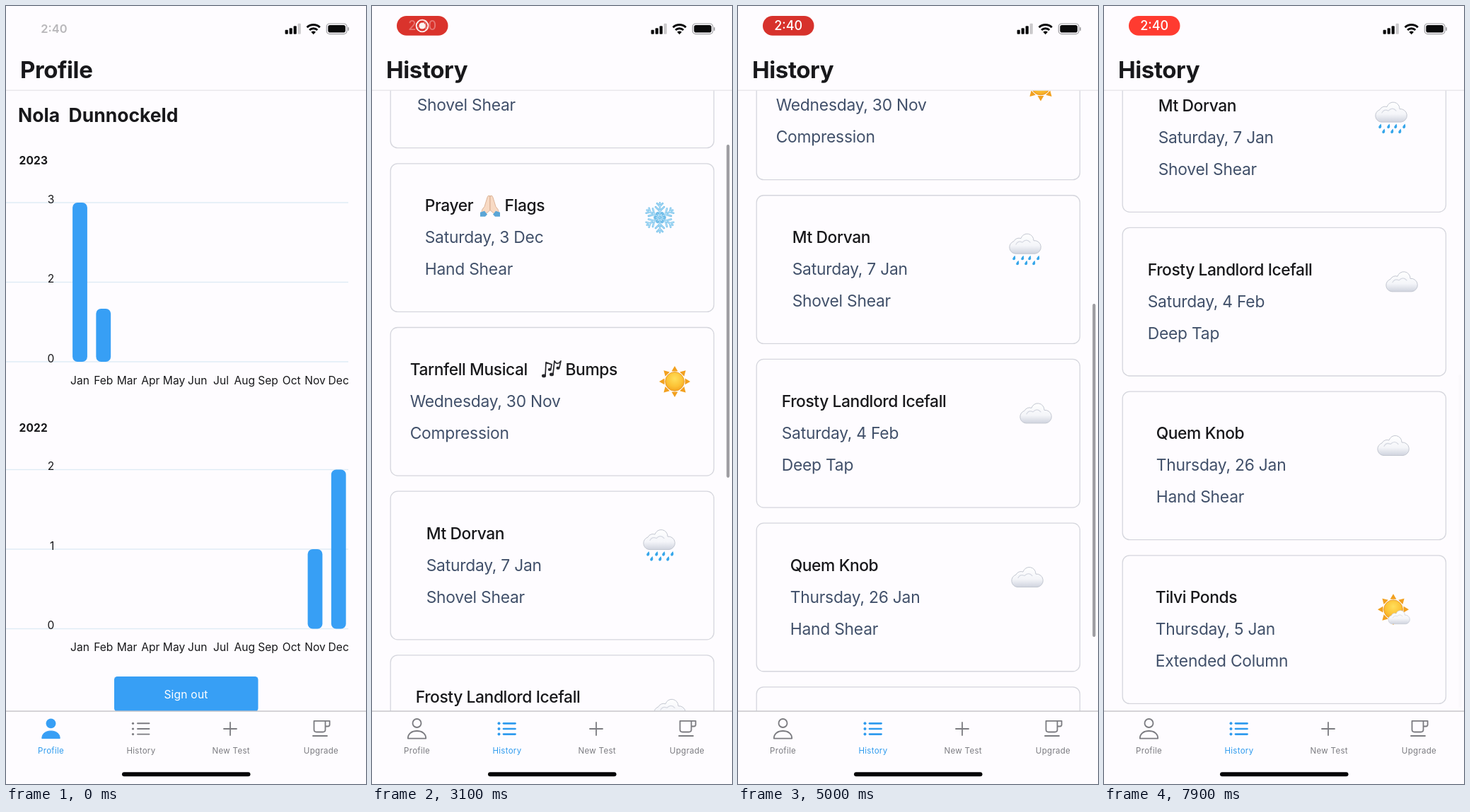
These frames come from a looping animation (509 px wide and 1100 px high, 8 s). An HTML page:

```html
<!DOCTYPE html>
<html lang="en">
<head>
<meta charset="utf-8">
<style>
html, body { margin: 0; width: 100%; height: 100%; overflow: hidden; background: #fefcff }
svg { display: block; font-family: Inter, "Open Sans", sans-serif; fill: #18181b }
.title { font-size: 33px; font-weight: 700; letter-spacing: -.4px }
.name { font-size: 26.5px; font-weight: 700 }
.year { font-size: 15.5px; font-weight: 700; letter-spacing: .2px }
.axis { font-size: 15.6px }
.button { font-size: 15.6px; letter-spacing: .2px; fill: #fff }
.place { font-size: 22.8px; font-weight: 500; letter-spacing: -.4px }
.detail { font-size: 22.8px; letter-spacing: -.22px; fill: #41506a }
.tab { font-size: 11.5px; letter-spacing: .3px }
.clock { font-size: 16.5px; font-weight: 600 }
.mid { text-anchor: middle }
.end { text-anchor: end }
</style>
</head>
<body>
<svg id="stage" width="509" height="1100" viewBox="0 0 509 1100"></svg>
<script>
const LOOP = 8000, SWITCH = 1600, PITCH = 231.7, BLUE = '#379ff5', PAGE = '#fefcff';
const stage = document.getElementById('stage');

const text = (x, y, cls, s, extra = '') => `<text x="${x}" y="${y}" class="${cls}" ${extra}>${s}</text>`;
const rect = (x, y, w, h, fill, r = 0, extra = '') =>
  `<rect x="${x}" y="${y}" width="${w}" height="${h}" fill="${fill}" rx="${r}" ${extra}/>`;
const path = (d, extra) => `<path d="${d}" ${extra}/>`;
const line = (color, w) => `fill="none" stroke="${color}" stroke-width="${w}" stroke-linecap="round" stroke-linejoin="round"`;
const at = (x, y, body, extra = '') => `<g transform="translate(${x} ${y}) ${extra}">${body}</g>`;
const spin = (n, body) => Array.from({ length: n }, (_, i) => `<g transform="rotate(${i * 360 / n})">${body}</g>`).join('');

// Small pictures, each centred on 0,0
const cloud = path('M-13 14a9 9 0 0 1-2-17.5a8 8 0 0 1 10-4a9.2 9.2 0 0 1 18 3a9.3 9.3 0 0 1 2 18.5z',
  'fill="url(#cloud)" stroke="#c3c7d1" stroke-width="1"') +
  path('M-12 1q3-6 9-3q6-6 11 0', line('#d6d9e2', 1.2));
const sun = spin(8, path('M-4.4-14.5L0-22L4.4-14.5z', 'fill="#f2a01f"')) +
  '<circle r="13.3" fill="url(#sun)" stroke="#e9981d" stroke-width=".9"/>';
const drop = (x, y) => path(`M${x + 2.5} ${y - 3.5}q2.2 6-1.6 6.6q-4.2-1 1.6-6.6z`, 'fill="#35a6ea"');
const icons = {
  sun,
  cloud,
  rain: at(0, -8, cloud) + [[-16, 12], [-4, 12], [6, 12], [18, 12], [-11, 19], [1, 19], [12, 19]].map(p => drop(...p)).join(''),
  partly: sun + at(7.5, 11, cloud, 'scale(.68)'),
  snow: spin(6, path('M0 0V-21M-4-20L0-16L4-20M-6-15L0-9L6-15M-3-7L0-4L3-7', line('#6fbde9', 2.6)) +
    path('M0 0V-21M-4-20L0-16L4-20M-6-15L0-9L6-15', line('#c4e8fa', 1)))
};
const notes = path('M-9 9L-8-10L0-7L-1-1M2 6L4-12Q8-5 13-12L11-3', line('#27272b', 1.7)) +
  '<g fill="#27272b"><ellipse cx="-11" cy="9" rx="3" ry="2.4"/><ellipse cx="-2.8" cy="0" rx="2.5" ry="2"/>' +
  '<ellipse cx="0" cy="7" rx="3" ry="2.4"/><ellipse cx="9" cy="-2" rx="2.6" ry="2.1"/></g>';
const half = path('M0-14q-3-2-4 2L-8 1q-4 4-4 7l4 5L0 6z', 'fill="#f8dac4" stroke="#d3a688" stroke-width=".8"') +
  path('M-14 9l6-2l4 5l-3 3h-7z', 'fill="#5aa5d6"');
const hands = half + at(0, 0, half, 'scale(-1 1)');

function chart(top, year, values, bars) {
  const months = 'Jan Feb Mar Apr May Jun Jul Aug Sep Oct Nov Dec'.split(' ');
  const center = i => 104.5 + i * 33.25;
  return text(18.5, top - 54, 'year', year) +
    values.map((v, i) => rect(0, top + i * 112.5 - .7, 484, 1.4, '#deebf5') +
      text(68.3, top + i * 112.5 + .5, 'axis end', v)).join('') +
    bars.map(([i, h]) => rect(center(i) - 10.4, top + 225 - h, 20.8, h, BLUE, 7)).join('') +
    '<g clip-path="url(#plot)">' +
    months.map((m, i) => text(center(i), top + 256.5, 'axis mid', m)).join('') + '</g>';
}

const profile = text(17, 164, 'name', 'Nola') + text(88.5, 164, 'name', 'Dunnockeld') +
  chart(278, 2023, [3, 2, 0], [[0, 225], [1, 75]]) +
  chart(655.5, 2022, [2, 1, 0], [[10, 112.5], [11, 225]]) +
  rect(153, 948, 203.5, 49.5, BLUE, 4.5) + text(254.5, 979, 'button mid', 'Sign out');

const tests = [
  [65, 'Larkspur Shoulder Bowl', 'Saturday, 26 Nov', 'Shovel Shear', 'cloud'],
  [76, 'Prayer', 'Saturday, 3 Dec', 'Hand Shear', 'snow', at(167, 60.5, hands) + text(187.5, 68, 'place', 'Flags')],
  [55, 'Tarnfell Musical', 'Wednesday, 30 Nov', 'Compression', 'sun', at(254, 60, notes) + text(273.5, 68, 'place', 'Bumps')],
  [78, 'Mt Dorvan', 'Saturday, 7 Jan', 'Shovel Shear', 'rain'],
  [63, 'Frosty Landlord Icefall', 'Saturday, 4 Feb', 'Deep Tap', 'cloud'],
  [75, 'Quem Knob', 'Thursday, 26 Jan', 'Hand Shear', 'cloud'],
  [74, 'Tilvi Ponds', 'Thursday, 5 Jan', 'Extended Column', 'partly']
];
const card = ([x, place, date, kind, icon, more = ''], i) => at(0, 129.7 + i * PITCH,
  rect(26.2, .6, 457.2, 209.6, 'none', 10, 'stroke="#d5d6dd" stroke-width="1.3"') +
  text(x - 1.3, 68, 'place', place) + more +
  text(x - 1.3, 113, 'detail', date) + text(x - 1.3, 158, 'detail', kind) +
  at(483 - x, 77, icons[icon]));

function tabBar(active) {
  const color = i => i === active ? '#2f9bee' : '#7b7b80';
  const on = active === 1, body = 'M50.8 1035.6c0-7 5.5-10.6 12.7-10.6s12.7 3.6 12.7 10.6z';
  const person = active === 0
    ? `<g fill="${BLUE}"><circle cx="63.5" cy="1014.3" r="6.9"/>${path(body, `stroke="${BLUE}" stroke-linejoin="round"`)}</g>`
    : `<circle cx="63.5" cy="1014" r="6" ${line(color(0), 1.8)}/>` + path(body, line(color(0), 1.8));
  const list = [1014.3, 1022, 1029.6].map(y =>
    path(`M186 ${y}H202.5`, line(color(1), on ? 2.7 : 1.9)) +
    `<circle cx="179.5" cy="${y}" r="${on ? 2 : 1.6}" fill="${color(1)}"/>`).join('');
  const plus = path('M308 1022H326M317 1013V1031', line(color(2), 1.8));
  const cup = path('M435.5 1010.8H457.6V1016q0 2.5-2.5 2.5H451.5M435.5 1010.8V1023q0 3.5 3.5 3.5H448q3.5 0 3.5-3.5V1010.8M434 1032H454', line(color(3), 1.8));
  return person + list + plus + cup + ['Profile', 'History', 'New Test', 'Upgrade']
    .map((s, i) => text(63.6 + i * 127.3, 1057.2, 'tab mid', s, `fill="${color(i)}"`)).join('');
}

const status = [6, 8.5, 11.5, 15].map((h, i) =>
  rect(394.6 + i * 6, 39.8 - h, 4.2, h, i < 3 ? '#0b0b0c' : '#cbc9cc', 1)).join('') +
  path('M425.6 30.2a13 13 0 0 1 18.2 0M429.1 34a8 8 0 0 1 11.2 0', 'fill="none" stroke="#0b0b0c" stroke-width="3"') +
  path('M434.7 40.2l-3.3-3.4q3.3-2.4 6.6 0z', 'fill="#0b0b0c"') +
  rect(453.3, 25, 28.6, 14.6, 'none', 4.3, 'stroke="#a09fa3" stroke-width="1.2"') +
  rect(455.3, 27, 24.6, 10.6, '#0b0b0c', 2.8) + rect(483.2, 30, 1.7, 5, '#a09fa3', .8);

const screen = (id, title, body, active) => `<g id="${id}">${body}` +
  rect(0, 0, 509, 119, PAGE) + rect(0, 118.6, 509, 1.2, '#e4e3e8') + text(20, 102, 'title', title) +
  rect(0, 997, 509, 103, PAGE) + rect(0, 996.3, 509, 1.5, '#c8c7cb') + tabBar(active) + '</g>';

stage.innerHTML = `<defs>
  <linearGradient id="cloud" x2="0" y2="1"><stop stop-color="#fff"/><stop offset=".6" stop-color="#f4f5f9"/><stop offset="1" stop-color="#cfd3de"/></linearGradient>
  <radialGradient id="sun" cy=".35" r=".7"><stop stop-color="#ffdf5c"/><stop offset=".6" stop-color="#fcc235"/><stop offset="1" stop-color="#f3a01f"/></radialGradient>
  <clipPath id="plot"><rect width="484" height="1000"/></clipPath></defs>` +
  rect(0, 0, 509, 1100, PAGE) +
  screen('profile', 'Profile', profile, 0) +
  screen('history', 'History', `<g id="list">${tests.map(card).join('')}</g>` +
    rect(501.3, 121, 4.2, 471, '#9c9ba0', 2.1, 'id="bar"'), 1) +
  status + rect(164, 1083.2, 181.5, 6, '#060607', 3) +
  text(68, 38.3, 'clock mid', '2:40', 'id="oldClock"') +
  '<g id="pill">' + rect(35, 14, 72.5, 27.8, '#ff3b30', 13.9, 'id="pillShape"') +
  '<g id="record"><circle cx="71" cy="28" r="8.4" fill="none" stroke="#fff" stroke-width="1.8"/><circle cx="71" cy="28" r="4.6" fill="#fff"/></g>' +
  text(71.2, 34.4, 'mid', '2:40', 'id="clock" fill="#fff" font-size="18" font-weight="500"') + '</g>';

const el = {};
stage.querySelectorAll('[id]').forEach(n => el[n.id] = n);

const ramp = (t, a, b) => Math.min(1, Math.max(0, (t - a) / (b - a)));
const scrollKeys = [[2300, 0], [3100, 139], [3900, 359], [4500, 472.5], [5800, 669], [7200, 743.7]];

// Smooth curve through the keys, at rest at both ends
function scrollAt(t) {
  const k = scrollKeys, last = k.length - 1;
  if (t <= k[0][0]) return k[0][1];
  if (t >= k[last][0]) return k[last][1];
  const rate = i => (k[i + 1][1] - k[i][1]) / (k[i + 1][0] - k[i][0]);
  const slope = i => i === 0 || i === last ? 0 : (rate(i - 1) + rate(i)) / 2;
  const i = k.findIndex(p => p[0] > t) - 1;
  const [t0, a] = k[i], [t1, b] = k[i + 1], d = t1 - t0, u = (t - t0) / d, v = 1 - u;
  return a * v * v * (1 + 2 * u) + b * u * u * (3 - 2 * u) + d * u * v * (slope(i) * v - slope(i + 1) * u);
}

function draw(t) {
  const onHistory = t >= SWITCH, s = scrollAt(t);
  el.profile.style.display = onHistory ? 'none' : '';
  el.history.style.display = onHistory ? '' : 'none';
  el.list.setAttribute('transform', `translate(0 ${-s})`);
  el.bar.setAttribute('transform', `translate(0 ${s * .538})`);
  el.bar.style.opacity = ramp(t, 2280, 2400) * (1 - .97 * ramp(t, 7500, 7850));

  const glow = (1 + Math.cos((t - 1900) * Math.PI / 1000)) / 2;
  el.pillShape.setAttribute('fill', `rgb(${214 + 41 * glow},${50 + 9 * glow},${44 + 4 * glow})`);
  el.oldClock.style.opacity = .3 * (1 - ramp(t, 0, 150));
  el.pill.style.opacity = ramp(t, 100, 450);
  el.record.style.opacity = 1 - ramp(t, 3080, 3400);
  el.clock.style.opacity = ramp(t, 2980, 3350);
}

const start = performance.now();
(function tick() {
  draw((performance.now() - start) % LOOP);
  requestAnimationFrame(tick);
})();
</script>
</body>
</html>
```
